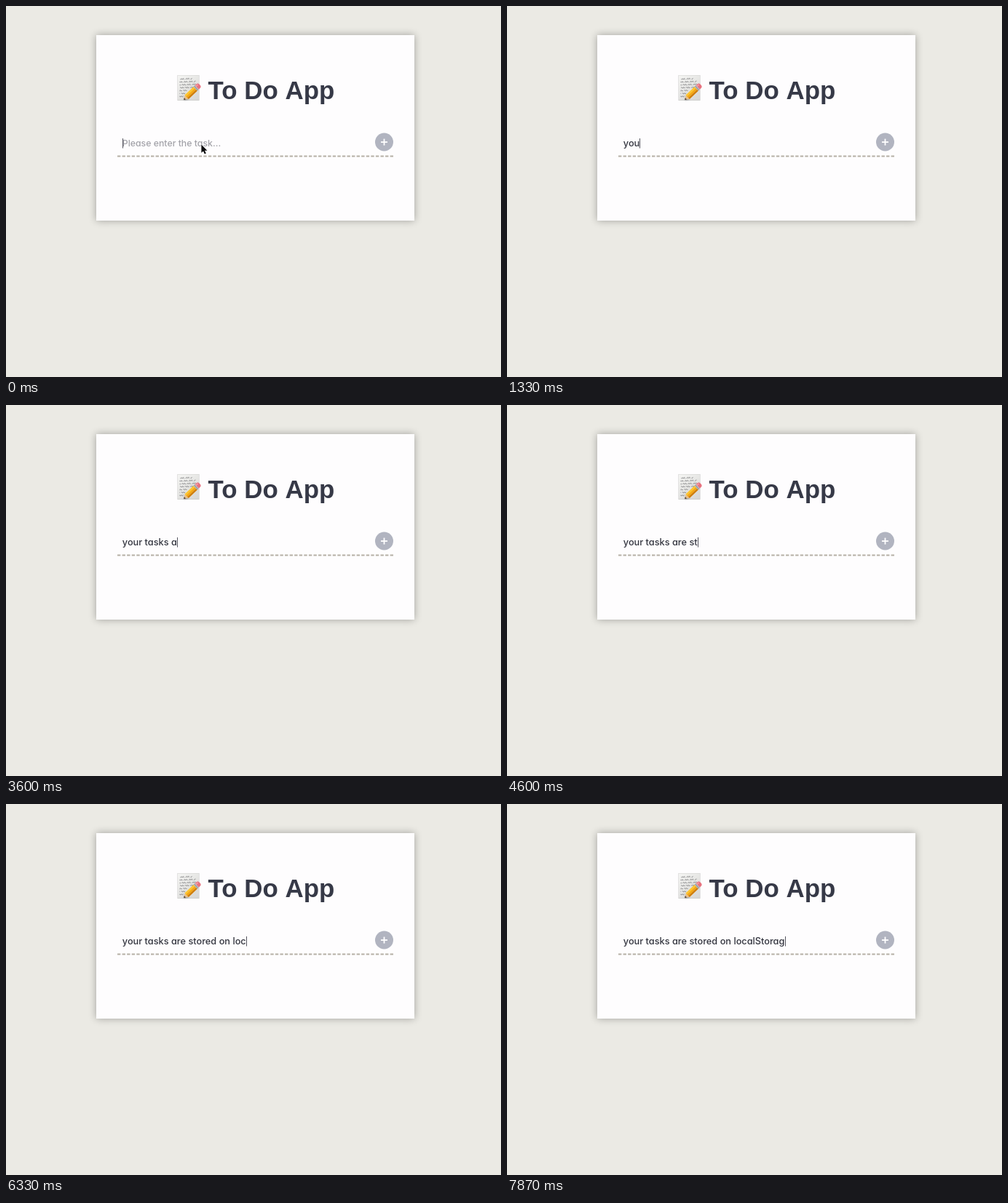
An HTML page with a canvas for the animation above (8 s loop, 680 px wide and 510 px high).

```html
<!DOCTYPE html>
<html lang="en">
<head>
<meta charset="utf-8">
<title>To Do App</title>
<style>
  html, body { margin: 0; width: 100%; height: 100%; overflow: hidden; background: #ebeae4; }
  canvas, svg { position: absolute; left: 0; top: 0; display: block; }
  .card {
    position: absolute; left: 124px; top: 40px; width: 437px; height: 255px;
    background: #fefdfe; box-shadow: 0 0 10px rgba(0, 0, 0, .32);
  }
  #field {
    font-family: Inter, Lato, sans-serif; font-feature-settings: "cv11" 1;
    font-weight: 450; white-space: pre;
  }
</style>
</head>
<body>
<div class="card"></div>
<canvas id="stage" width="680" height="510"></canvas>
<svg width="680" height="510">
  <text id="field" x="159.8" y="192.6" xml:space="preserve"></text>
  <rect id="caret" y="182" width="1" height="13.5" fill="#55555f"/>
  <path id="pointer" d="M268.4 190.6v11.2l2.6-2.4 1.9 4 1.9-.9-1.8-3.8h3.4z"
        fill="#0b0b0d" stroke="#fff" stroke-width=".9" paint-order="stroke"/>
</svg>
<script>
const LOOP = 8000;
const MESSAGE = 'your tasks are stored on localStorag';
const PLACEHOLDER = 'Please enter the task...';
// Moment at which each character of MESSAGE appears.
const KEY_TIMES = [
  1000, 1130, 1330, 1530, 1730,
  2000, 2200, 2400, 2670, 2870, 3070,
  3600, 3800, 3930, 4130, 4330,
  4600, 4730, 4870, 5070, 5200, 5330, 5530,
  5730, 5870, 6070, 6200, 6330, 6470, 6600,
  6930, 7070, 7200, 7400, 7670, 7870
];

const ctx = document.getElementById('stage').getContext('2d');
const field = document.getElementById('field');
const caret = document.getElementById('caret');
const pointer = document.getElementById('pointer');

function box(x, y, w, h, fill) {
  ctx.fillStyle = fill;
  ctx.fillRect(x, y, w, h);
}

function polygon(points, fill) {
  ctx.beginPath();
  points.forEach(([x, y]) => ctx.lineTo(x, y));
  ctx.closePath();
  ctx.fillStyle = fill;
  ctx.fill();
}

function drawPaper() {
  const shade = ctx.createLinearGradient(236, 95, 265, 130);
  shade.addColorStop(0, '#f5f5f3');
  shade.addColorStop(1, '#d5d5d3');
  box(235.5, 95, 30, 35, '#c9c9c7');
  box(236, 95.4, 29, 34, shade);

  ctx.strokeStyle = '#606064';
  ctx.lineWidth = 0.6;
  for (let row = 0; row < 7; row++) {
    const y = 100.5 + row * 4;
    const right = row === 0 ? 256 : row < 4 ? 261 : 249 - (row - 4) * 1.5;
    ctx.beginPath();
    for (let x = 238.5; x < right; x += 0.5) {
      if (Math.sin(x * 0.9 + row * 2.3) > 0.7) ctx.moveTo(x, y);
      else ctx.lineTo(x, y + Math.sin(x * 2.6 + row) * 0.8 - (x - 238) * 0.04);
    }
    ctx.stroke();
  }
}

// Drawn along the x axis from the tip, then turned into place.
function drawPencil() {
  ctx.save();
  ctx.translate(244.2, 129);
  ctx.rotate(Math.atan2(-20, 21));
  ctx.shadowColor = 'rgba(0, 0, 0, .3)';
  ctx.shadowBlur = 2;
  ctx.shadowOffsetY = 1;
  polygon([[0, 0], [6, -3.8], [6, 3.8]], '#e9c08b');
  ctx.shadowColor = 'transparent';
  polygon([[0, 0], [2.4, -1.5], [2.4, 1.5]], '#3b3534');
  box(5.5, -3.9, 17, 2.5, '#fdc62f');
  box(5.5, -1.4, 17, 2.8, '#f7a90f');
  box(5.5, 1.4, 17, 2.5, '#d07d08');
  box(22, -3.9, 3, 7.8, '#b9bcc1');
  box(23, -3.9, 0.8, 7.8, '#868a91');
  ctx.beginPath();
  ctx.roundRect(25, -3.8, 5.2, 7.6, [0, 3, 3, 0]);
  ctx.fillStyle = '#e8727f';
  ctx.fill();
  box(25, -2.6, 3.5, 1.5, '#f5a2aa');
  ctx.restore();
}

function drawScene() {
  drawPaper();
  drawPencil();

  ctx.font = 'bold 34.9px "Liberation Sans", Arial, sans-serif';
  ctx.fillStyle = '#363947';
  ctx.fillText('To Do App', 277.6, 128.2);

  const dash = 4.37;
  ctx.strokeStyle = '#b5b0a5';
  ctx.lineWidth = 2.1;
  ctx.setLineDash([dash, (379 - dash) / 57 - dash]);
  ctx.beginPath();
  ctx.moveTo(153, 206.5);
  ctx.lineTo(532, 206.5);
  ctx.stroke();
  ctx.setLineDash([]);

  ctx.beginPath();
  ctx.arc(519.5, 187, 12.5, 0, Math.PI * 2);
  ctx.fillStyle = '#b1b4c0';
  ctx.fill();
  box(515, 186.2, 9, 1.8, '#fff');
  box(518.6, 182.6, 1.8, 9, '#fff');
}

let shown = -1;
function frame() {
  const t = performance.now() % LOOP;
  const typed = KEY_TIMES.filter(time => time <= t).length;
  if (typed !== shown) {
    shown = typed;
    field.textContent = typed ? MESSAGE.slice(0, typed) : PLACEHOLDER;
    field.setAttribute('fill', typed ? '#33353f' : '#a3a3a9');
    field.style.fontSize = typed ? '12.75px' : '12.3px';
  }
  const width = typed ? field.getComputedTextLength() : 0;
  caret.setAttribute('x', Math.round(160 + width));
  caret.style.visibility = t >= 200 && t < 730 ? 'hidden' : 'visible';
  pointer.style.visibility = t < 470 ? 'visible' : 'hidden';
  requestAnimationFrame(frame);
}

drawScene();
frame();
</script>
</body>
</html>
```
